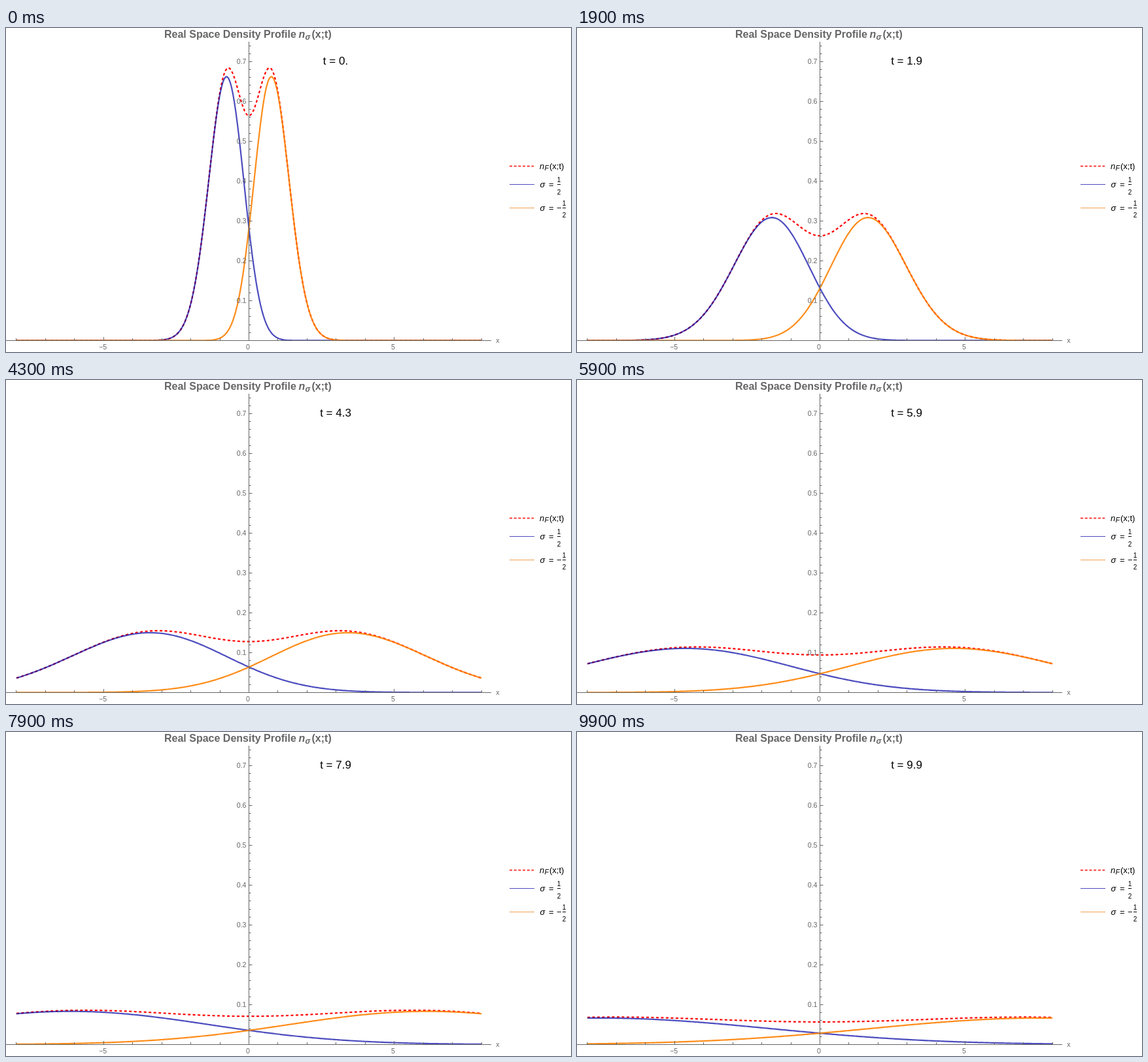
An HTML page for the animation above (10 s loop, 864 by 496 pixels).

```html
<!DOCTYPE html>
<html lang="en">
<head>
<meta charset="utf-8">
<title>Density profile</title>
<style>
  html, body { margin: 0; width: 100%; height: 100%; overflow: hidden; background: #fff; }
  svg { display: block; width: 864px; height: 496px; font-family: "Liberation Sans", Arial, sans-serif; }
  .curve { fill: none; stroke-width: 2.2; stroke-linejoin: round; }
  .axis { stroke: #666; stroke-width: 1; fill: none; }
  .tick { fill: #666; font-size: 10.6px; }
  .title { fill: #666; font-size: 16px; font-weight: bold; }
  .key { font-size: 13px; }
  .frac { font-size: 10px; text-anchor: middle; }
  .it { font-style: italic; }
</style>
</head>
<body>
<svg viewBox="0 0 864 496">
  <defs><clipPath id="plot"><rect width="760" height="478"/></clipPath></defs>
  <g clip-path="url(#plot)">
    <path id="total" class="curve" stroke="#f00" stroke-dasharray="4 3.5"/>
    <path id="up" class="curve" stroke="#0000a4" stroke-opacity=".7"/>
    <path id="down" class="curve" stroke="#ff8000" stroke-opacity=".9"/>
  </g>
  <g id="axes"></g>

  <g class="title">
    <text x="242" y="15">Real Space Density Profile</text>
    <text x="447.5" y="15" class="it">n</text>
    <text x="457.5" y="18" class="it" font-size="12">σ</text>
    <text x="467.5" y="15">(x;t)</text>
  </g>
  <text id="clock" x="504" y="56" font-size="17" text-anchor="middle"></text>

  <g fill="none">
    <path d="M770 211.5H807" stroke="#f00" stroke-width="1.4" stroke-dasharray="4 2.7"/>
    <path d="M770 239.5H808" stroke="#4d4dbf"/>
    <path d="M770 275.5H808" stroke="#f2a052"/>
  </g>
  <g class="key">
    <text x="816" y="215.5" class="it">n</text>
    <text x="823.5" y="218" class="it" font-size="10.5">F</text>
    <text x="831" y="215.5">(x;t)</text>
    <text x="816.5" y="244" class="it">σ</text>
    <text x="830" y="244">=</text>
    <text x="816.5" y="279.5" class="it">σ</text>
    <text x="830" y="279.5">=</text>
    <text x="842" y="279.5">−</text>
  </g>
  <g class="frac">
    <text x="845.5" y="236">1</text>
    <text x="845.5" y="254.5">2</text>
    <text x="853.5" y="271.5">1</text>
    <text x="853.5" y="290">2</text>
    <path d="M843 239.5H848M851 275.5H856" stroke="#000"/>
  </g>
</svg>
<script>
const X0 = 371.5, Y0 = 478.4, UNIT_X = 44.45, UNIT_Y = 610;
const STEP = 100, STEPS = 100, RANGE = 8, SAMPLES = 320;
const $ = id => document.getElementById(id);
const px = x => X0 + x * UNIT_X;
const py = y => Y0 - y * UNIT_Y;

// Rational approximation of the complementary error function.
function erfc(x) {
  if (x < 0) return 2 - erfc(-x);
  const k = 1 / (1 + 0.3275911 * x);
  const poly = k * (0.254829592 + k * (-0.284496736 + k * (1.421413741
    + k * (-1.453152027 + k * 1.061405429))));
  return poly * Math.exp(-x * x);
}

// Two fermions in a harmonic trap: total density, and that of the left one.
const total = x => Math.exp(-x * x) * (1 + 2 * x * x) / Math.sqrt(Math.PI);
const left = x => total(x) * erfc(x) / 2 - x * Math.exp(-2 * x * x) / Math.PI;
const right = x => left(-x);

// Free expansion only rescales each profile.
function trace(density, scale) {
  let d = "";
  for (let i = 0; i <= SAMPLES; i++) {
    const x = RANGE * (2 * i / SAMPLES - 1);
    const y = density(x / scale) / scale;
    d += (i ? "L" : "M") + px(x).toFixed(2) + " " + py(y).toFixed(2);
  }
  return d;
}

function drawAxes() {
  let d = "M0 478.5H742M371.5 21V479", labels = "";
  const label = (x, y, text, anchor) =>
    labels += `<text class="tick" x="${x}" y="${y}" text-anchor="${anchor}">${text}</text>`;
  const snap = v => Math.floor(v) + 0.5;

  for (let x = -RANGE; x <= RANGE; x++) {
    if (x) d += `M${snap(px(x))} 478v${x % 5 ? -3 : -5}`;
  }
  for (let i = 1; i <= 37; i++) {
    d += `M372 ${snap(py(i / 50))}h${i % 5 ? 2.5 : 4.5}`;
  }
  for (let i = 1; i <= 7; i++) label(367.5, 54.5 + (7 - i) * 61, "0." + i, "end");
  label(148, 492, "−5", "middle");
  label(370, 492, "0", "middle");
  label(592, 492, "5", "middle");
  label(752, 481.5, "x", "middle");
  $("axes").innerHTML = `<path class="axis" d="${d}"/>` + labels;
}

let shown = -1;
function render(now) {
  const step = Math.floor(now / STEP) % STEPS;
  if (step !== shown) {
    shown = step;
    const t = step / 10, scale = Math.hypot(1, t);
    $("total").setAttribute("d", trace(total, scale));
    $("up").setAttribute("d", trace(left, scale));
    $("down").setAttribute("d", trace(right, scale));
    $("clock").textContent = "t = " + (step % 10 ? t.toFixed(1) : t + ".");
  }
}

const start = performance.now();
function loop() {
  render(performance.now() - start);
  requestAnimationFrame(loop);
}
drawAxes();
loop();
</script>
</body>
</html>
```
